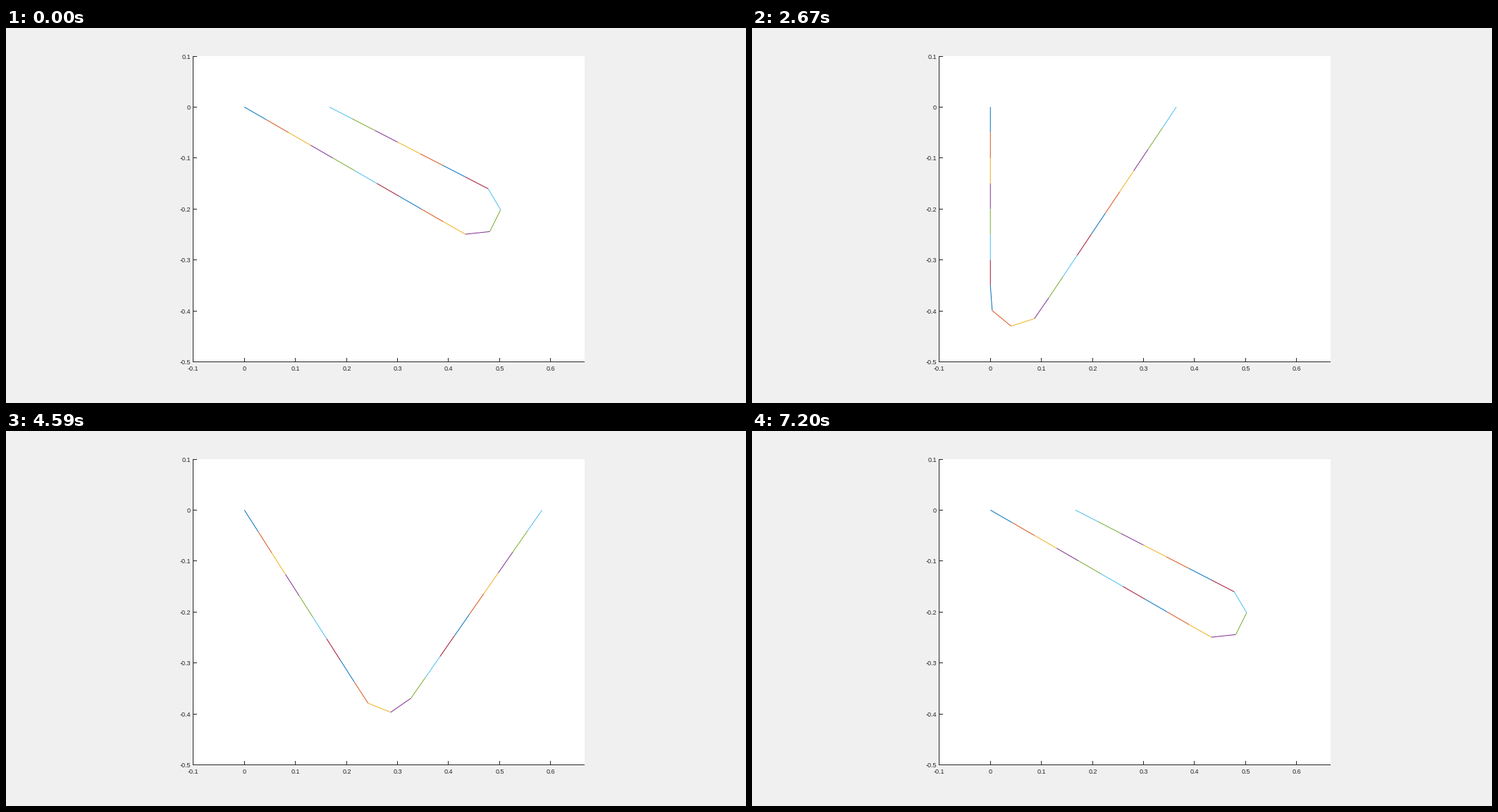
Recreate the animation shown at these times as a matplotlib script. Size 1050 by 533 pixels, loop 7230 ms.

```python
import math

import matplotlib.pyplot as plt
import numpy as np
from matplotlib.animation import FuncAnimation
from matplotlib.collections import LineCollection
from matplotlib.patches import Rectangle

W, H, DPI = 1050, 533, 100
SCALE = 724.0              # pixels per data unit
X0, Y0 = 338.24, 112.37    # pixel position of the data origin
INK = "#262626"
COLORS = ["#0072BD", "#D95319", "#EDB120", "#7E2F8E",
          "#77AC30", "#4DBEEE", "#A2142F"]

LINKS = 20                 # pieces of a tape of length 1
RADIUS = 0.05              # bend radius
STEPS = 60                 # frames per phase
NEAR, FAR = 1 / 6, 7 / 12  # range of the sliding anchor
LOW, HIGH = 30, 90         # range of the left arm angle, degrees


def px(x):
    return X0 + SCALE * x


def py(y):
    return Y0 - SCALE * y


def pose(frame):
    """Left arm direction (radians) and anchor position."""
    phase, i = divmod(max(frame - 1, 0), STEPS)
    k = i / (STEPS - 1)
    turn = [k, 1, 1 - k, 0][phase]
    slide = [0, k, 1, 1 - k][phase]
    return (-math.radians(LOW + (HIGH - LOW) * turn),
            NEAR + (FAR - NEAR) * slide)


def bend(left, theta, anchor):
    """Right arm length, its direction and the bend angle."""
    center = np.exp(1j * theta) * (left + 1j * RADIUS)
    v = center - anchor
    right = math.sqrt(max(abs(v) ** 2 - RADIUS ** 2, 0))
    u = v / (-right + 1j * RADIUS)
    return right, u, (np.angle(u) - theta) % (2 * math.pi)


def tape(theta, anchor):
    """Points along the tape, evenly spaced by arc length."""
    lo, hi = 0.2, 0.8
    for _ in range(45):
        left = (lo + hi) / 2
        right, u, angle = bend(left, theta, anchor)
        if left + right + RADIUS * angle > 1:
            hi = left
        else:
            lo = left
    d = np.exp(1j * theta)
    arc = RADIUS * angle
    pts = []
    for n in range(LINKS + 1):
        s = n / LINKS
        if s <= left:
            z = s * d
        elif s < left + arc:
            phi = (s - left) / RADIUS
            z = d * (left + 1j * RADIUS * (1 - np.exp(1j * phi)))
        else:
            z = anchor - (1 - s) * u
        pts.append((px(z.real), py(z.imag)))
    return pts


fig = plt.figure(figsize=(W / DPI, H / DPI), dpi=DPI, facecolor="#f0f0f0")
ax = fig.add_axes([0, 0, 1, 1])
ax.set_xlim(0, W)
ax.set_ylim(H, 0)
ax.axis("off")


def box(x, y, w, h, color):
    ax.add_patch(Rectangle((x, y), w, h, fc=color, lw=0, zorder=1))


def label(x, y, value, ha):
    ax.text(x, y, f"{value / 10:g}", ha=ha, va="baseline", color=INK,
            family="Liberation Sans", size=9 * 72 / DPI)


LEFT, TOP, RIGHT, BOTTOM = 265, 40, 821, 474
box(LEFT, TOP, RIGHT - LEFT, BOTTOM - TOP, "white")
box(LEFT, TOP, 1, BOTTOM - TOP + 1, INK)
box(LEFT, BOTTOM, RIGHT - LEFT, 1, INK)

for v in range(-1, 7):
    x = int(px(v / 10) + 0.1)
    box(x, BOTTOM - 5, 1, 5, INK)
    label(x + 0.5, 487, v, "center")
for v in range(-5, 2):
    y = int(py(v / 10) + 0.1)
    box(LEFT, y, 6, 1, INK)
    label(262, y + 4, v, "right")

links = LineCollection([], colors=[COLORS[n % 7] for n in range(LINKS)],
                       linewidths=72 / DPI, capstyle="butt", zorder=3)
links.set_snap(False)
ax.add_collection(links, autolim=False)


def draw(frame):
    pts = tape(*pose(frame))
    links.set_segments(list(zip(pts, pts[1:])))
    return links,


anim = FuncAnimation(fig, draw, frames=4 * STEPS + 1, interval=30,
                     init_func=lambda: draw(0), repeat=True, repeat_delay=0)
plt.show()
```
